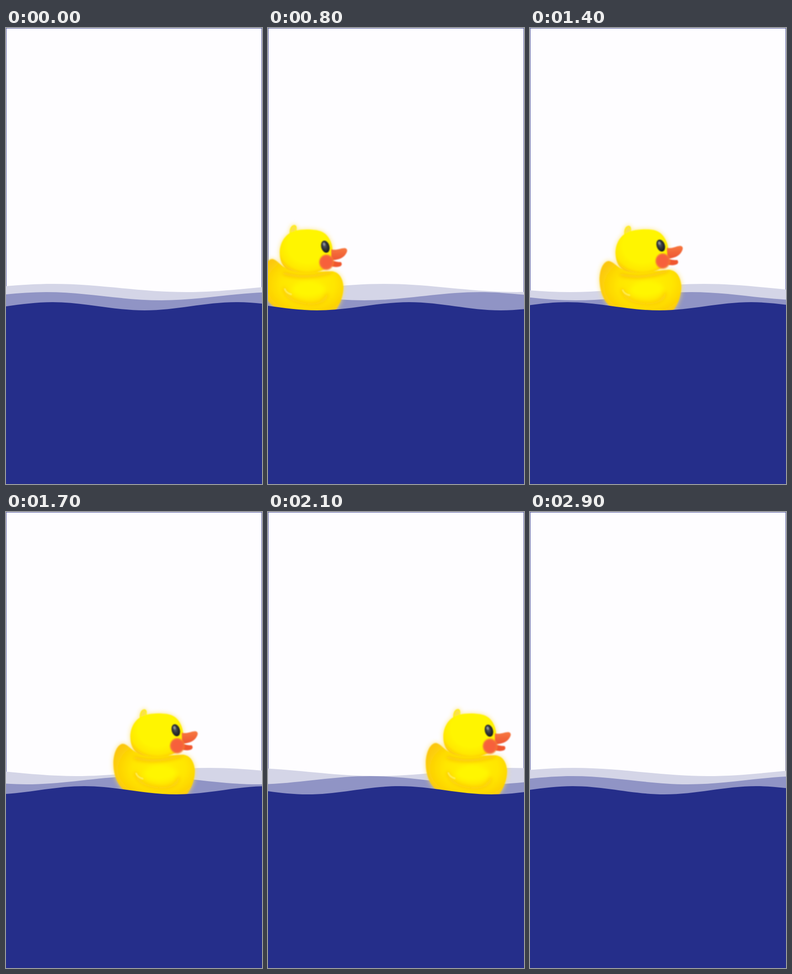
An HTML page for the animation above (3 s loop, 561x998 px).

```html
<!DOCTYPE html>
<html lang="en">
<head>
<meta charset="utf-8">
<title>Duck on waves</title>
<style>
  html, body { margin: 0; width: 100%; height: 100%; overflow: hidden; background: #fefdff; }
  svg { display: block; width: 561px; height: 998px; }
</style>
</head>
<body>
<svg viewBox="0 0 561 998">
  <defs>
    <filter id="glow" x="-20%" y="-20%" width="140%" height="140%"><feGaussianBlur stdDeviation="5"/></filter>
    <filter id="soft" x="-30%" y="-30%" width="160%" height="160%"><feGaussianBlur stdDeviation="4"/></filter>
    <filter id="edge" x="-20%" y="-20%" width="140%" height="140%"><feGaussianBlur stdDeviation=".8"/></filter>
    <radialGradient id="headFill" cx=".52" cy=".42" r=".62">
      <stop offset=".6" stop-color="#fff500"/><stop offset=".85" stop-color="#ffe800"/><stop offset="1" stop-color="#fdc90c"/>
    </radialGradient>
    <radialGradient id="bodyFill" cx=".56" cy=".45" r=".6">
      <stop offset="0" stop-color="#fff200"/><stop offset=".55" stop-color="#ffe600"/><stop offset="1" stop-color="#fcc70a"/>
    </radialGradient>
    <linearGradient id="beakFill" x1="0" y1="0" x2="0" y2="1">
      <stop offset="0" stop-color="#f7783f"/><stop offset="1" stop-color="#ee5532"/>
    </linearGradient>
    <radialGradient id="cheekFill">
      <stop offset=".5" stop-color="#f7603a"/><stop offset=".8" stop-color="#f5683a"/><stop offset="1" stop-color="#fa9a2a" stop-opacity=".3"/>
    </radialGradient>
    <radialGradient id="eyeFill" cx=".45" cy=".4" r=".6">
      <stop offset="0" stop-color="#5c626a"/><stop offset=".5" stop-color="#30343a"/><stop offset="1" stop-color="#17191c"/>
    </radialGradient>
    <path id="body" d="M92 505C79 506 70 528 70 550C70 577 80 600 97 610L106 630H218C237 616 248 590 248 567C247 548 238 534 222 533C200 533 150 537 126 527C111 521 103 506 92 505Z"/>
    <path id="head" d="M131 449C131 440 134 432 141 431C147 431 147 437 146 443C160 440 187 440 201 446C217 453 225 472 225 490C225 511 217 524 203 530C187 538 147 538 128 529C114 522 109 508 109 492C109 473 118 457 131 449Z"/>
    <clipPath id="bodyClip"><use href="#body"/></clipPath>
  </defs>
  <rect x=".5" y=".5" width="560" height="997" fill="none" stroke="#454c9b"/>
  <path id="back" fill="#d4d5e7"/>
  <path id="middle" fill="#9094c5"/>
  <g id="duck">
    <g filter="url(#glow)" fill="#ffe05a" stroke="#ffe05a" stroke-width="4" opacity=".55"><use href="#body"/><use href="#head"/></g>
    <g filter="url(#edge)">
      <use href="#body" fill="url(#bodyFill)"/>
      <g clip-path="url(#bodyClip)" filter="url(#soft)">
        <path d="M116 536Q165 552 222 534" fill="none" stroke="#fbbd10" stroke-width="7"/>
        <path d="M117 568Q124 600 172 604Q205 606 213 582" fill="none" stroke="#fcc60a" stroke-width="6"/>
        <ellipse cx="172" cy="572" rx="36" ry="17" fill="#fff600"/>
      </g>
      <path d="M119 570Q122 580 134 583" fill="none" stroke="#fff35a" stroke-width="2.5"/>
      <use href="#head" fill="url(#headFill)"/>
      <path d="M133 447Q135 435 141 433Q145 434 144 443Z" fill="#fbe14a"/>
    </g>
    <g filter="url(#edge)">
      <path d="M221 508Q232 513 243 513Q247 518 242 522Q232 526 219 521Z" fill="#f0562f"/>
      <path d="M222 485C235 488 243 482 252 482.500C258 484 258 489 254 495C248 505 237 508 222 509Z" fill="url(#beakFill)"/>
      <ellipse cx="211" cy="513" rx="17" ry="18" fill="url(#cheekFill)"/>
      <g transform="rotate(-16 209 479)">
        <ellipse cx="209" cy="479" rx="9" ry="13.500" fill="url(#eyeFill)"/>
        <ellipse cx="208" cy="473" rx="2.500" ry="3.500" fill="#8b9096"/>
      </g>
    </g>
  </g>
  <path id="front" fill="#252e8a"/>
</svg>
<script>
const LOOP = 3000, STEP = 100, CYCLE = 2935;
const byId = id => document.getElementById(id);

// travel: whole periods covered in one loop, negative runs left
const waves = [
  { el: byId('back'), top: 560, period: 585, crest: 103, travel: 1 },
  { el: byId('middle'), top: 578, period: 506, crest: 88, travel: -1 },
  { el: byId('front'), top: 600, period: 403, crest: 102, travel: 2 }
];

function wavePath({ top, period }) {
  const half = period / 2, a = half * .35, b = half - a;
  let d = `M${-2 * period} ${top}`;
  for (let i = 0; i < 5; i++)
    d += `c${a} 0 ${b} 18 ${half} 18c${a} 0 ${b} -18 ${half} -18`;
  return d + `V998H${-2 * period}Z`;
}

function draw(time) {
  const t = Math.floor(time % LOOP / STEP) * STEP;
  const p = t / CYCLE;
  const eased = p - .0155 * Math.sin(2 * Math.PI * p);
  for (const { el, period, crest, travel } of waves) {
    const x = (crest + travel * eased * period) % period;
    el.setAttribute('transform', `translate(${x})`);
  }
  const tilt = -1.8 - 2.2 * Math.cos(2 * Math.PI * (t - 450) / 1000);
  const x = .2758 * (t - 1100);
  byId('duck').setAttribute('transform', `translate(${x}) rotate(${tilt} 165 555)`);
}

for (const wave of waves) wave.el.setAttribute('d', wavePath(wave));
const start = performance.now();
function tick() {
  draw(performance.now() - start);
  requestAnimationFrame(tick);
}
tick();
</script>
</body>
</html>
```
